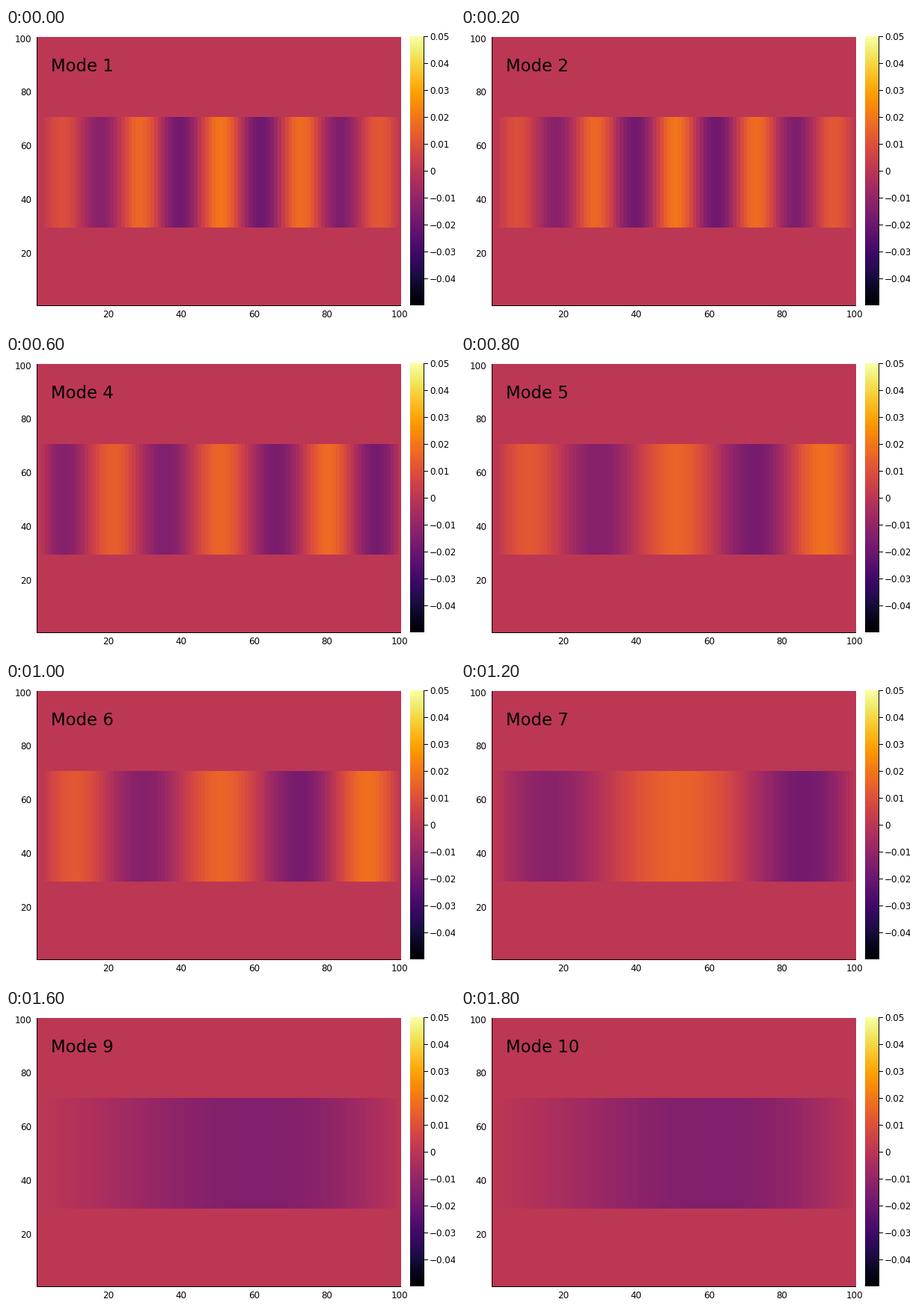
A matplotlib script for the animation above (2000 ms loop, 600 by 400 pixels).

```python
import numpy as np
import matplotlib.pyplot as plt
from matplotlib.animation import FuncAnimation
from matplotlib.patches import Rectangle

plt.rcParams["font.family"] = "DejaVu Sans"

W, H, DPI = 600, 400, 100
LEFT, RIGHT, TOP, BOTTOM = 42, 528, 12, 371
BAND_TOP, BAND_BOTTOM = 119, 267
BAR_LEFT, BAR_RIGHT = 540, 558
LIMIT = 0.05


def wave(n, warp, base, slope, dome):
    """Standing wave of n half waves, pinned at both ends.

    warp pushes the peaks outwards; base, slope and dome set the height.
    """
    u = np.clip((np.arange(1, 101) - 1.5) / 98.5, 0, 1)
    height = base + slope * u + dome * np.sin(np.pi * u)
    phase = n * np.pi * (u + warp * np.sin(2 * np.pi * u))
    return (height * np.sin(phase))[None, :] / 1000


# Modes come in pairs that share one shape.
SHAPES = [
    wave(9, 0.004, 7, 3.5, 10.5),
    -wave(7, 0.015, 13, 5, 0),
    wave(5, 0.018, 11.5, 7.5, 0),
    -wave(3, 0.03, 11, 8, 0),
    -wave(1, 0, 6, 16, 0),
]

fig = plt.figure(figsize=(W / DPI, H / DPI), dpi=DPI, facecolor="white")
ax = fig.add_axes([0, 0, 1, 1])


def label(x, y, text, size=11.85, ha="center"):
    """Text with its baseline at y and its size in pixels."""
    return ax.text(x, y, text, fontsize=size * 72 / DPI, ha=ha,
                   va="baseline", color="black")


def line(xs, ys):
    ax.plot(xs, ys, color="black", lw=72 / DPI, solid_capstyle="butt",
            snap=False, zorder=3)


def show(data, extent):
    return ax.imshow(data, extent=extent, cmap="inferno", vmin=-LIMIT,
                     vmax=LIMIT, interpolation="nearest", aspect="auto")


field = Rectangle((LEFT, TOP), RIGHT - LEFT, BOTTOM - TOP,
                  color=plt.get_cmap("inferno")(0.5), lw=0, zorder=-1)
ax.add_patch(field)
band = show(SHAPES[0], (LEFT + 0.3, RIGHT + 0.4, BAND_BOTTOM, BAND_TOP))
band.set_clip_path(field)
show(np.linspace(LIMIT, -LIMIT, 256)[:, None],
     (BAR_LEFT, BAR_RIGHT, 371, 11.5))

line([LEFT - 0.5, LEFT - 0.5], [TOP, BOTTOM + 1])
line([LEFT - 0.5, RIGHT], [BOTTOM + 0.5, BOTTOM + 0.5])
line([BAR_RIGHT + 0.5, BAR_RIGHT + 0.5], [TOP, BOTTOM])

for v in range(20, 101, 20):
    label(LEFT + 0.3 + (v - 0.5) * 4.86, 387, str(v))
    label(34.5, 375.75 - (v - 0.5) * 3.59, str(v), ha="right")

for k in range(-4, 6):
    y = 191.5 - 36 * k
    line([BAR_RIGHT, BAR_RIGHT + 6], [y, y])
    text = f"{k / 100:.2f}".replace("-", "\u2212") if k else "0"
    label(566, y + 4.4, text, ha="left")

title = label(60, 58, "Mode 1", 22.8, "left")

ax.set_xlim(0, W)
ax.set_ylim(H, 0)
ax.axis("off")


def update(i):
    band.set_data(SHAPES[i // 2])
    title.set_text(f"Mode {i + 1}")
    return band, title


anim = FuncAnimation(fig, update, frames=10, interval=200, repeat=True,
                     repeat_delay=0)
plt.show()
```
